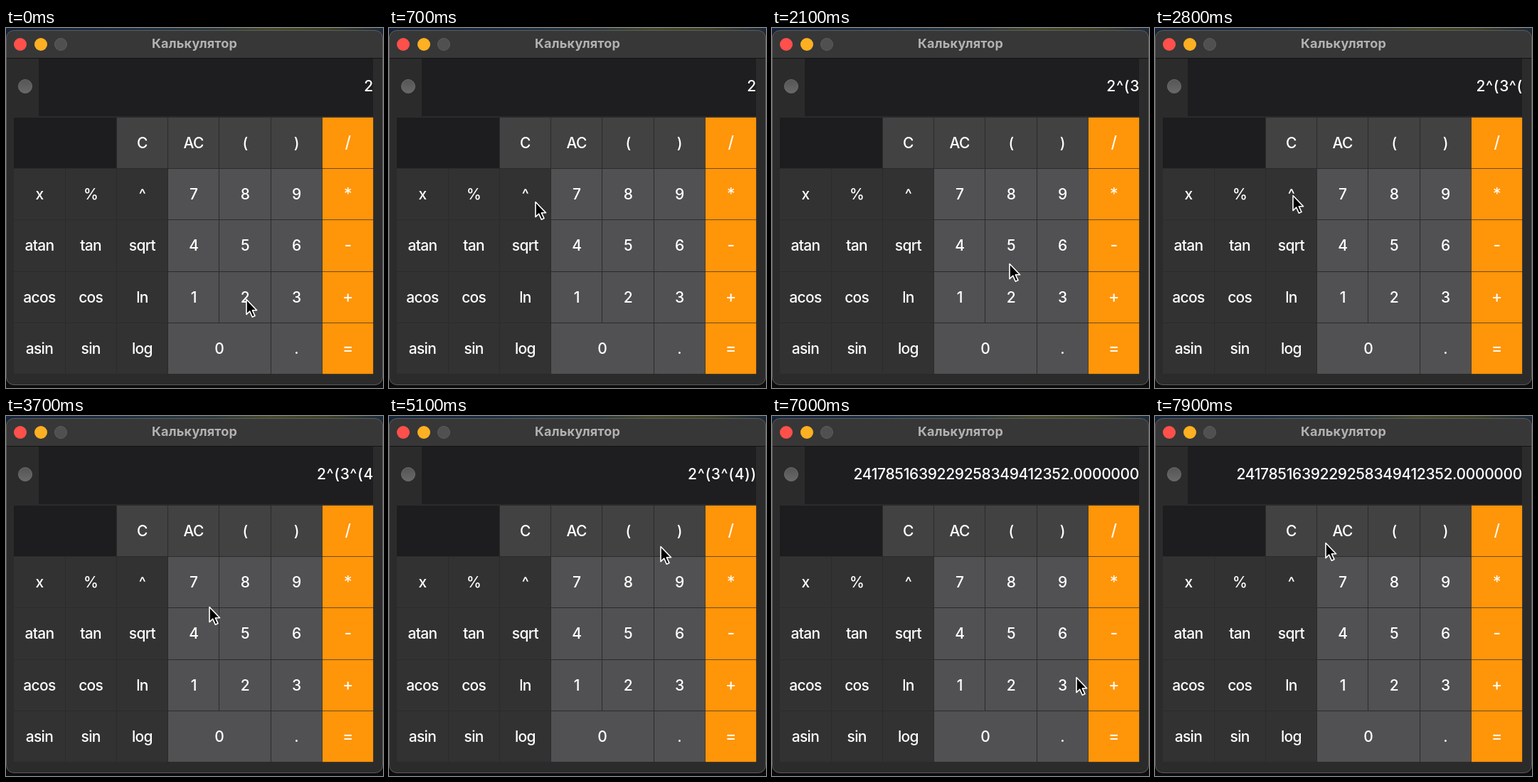
An HTML page that plays this animation: 530 by 506 pixels, repeating every 8 s.

```html
<!DOCTYPE html>
<html lang="ru">
<head>
<meta charset="utf-8">
<title>Калькулятор</title>
<style>
  html, body { margin: 0; width: 100%; height: 100%; overflow: hidden; background: #0b0c0e; }
  #stage {
    position: relative; width: 530px; height: 506px; overflow: hidden;
    background: linear-gradient(90deg, #14243d, #1d2f45 30%, #2a3a3c 55%, #46492a 70%, #3c4226 85%, #1b2a3c) 0 0 / 100% 14px no-repeat #0b0c0e;
    font: 500 21px Inter, Roboto, sans-serif; color: #fff;
  }
  #stage div, #stage svg { position: absolute; box-sizing: border-box; }
  #win { left: 0; top: 3px; width: 530px; height: 499px; border-radius: 11px; background: #2b2b2b; overflow: hidden; }
  #rim { inset: 0; border: 1px solid #5b5b5b; border-radius: 11px; }
  #bar {
    left: 0; top: 0; width: 530px; height: 40px; background: #373737; border-bottom: 1px solid #141414;
    font-weight: 700; font-size: 18px; line-height: 38px; letter-spacing: .2px; text-align: center; color: #b2b2b2;
  }
  .light { top: 10.5px; width: 18px; height: 18px; border-radius: 50%; }
  #lamp { left: 17px; top: 69px; width: 20px; height: 20px; border-radius: 50%; background: linear-gradient(#565656, #686868); border: 1px solid #6e6e6e; }
  #screen { left: 46px; top: 40px; width: 470px; height: 81px; background: #1e1e20; overflow: hidden; }
  #out { right: -1px; top: 0; line-height: 78px; white-space: pre; letter-spacing: .7px; }
  #out.result { right: 0; letter-spacing: -.35px; }
  .key { text-align: center; letter-spacing: -.7px; }
  .blank { background: #1d1d1f; }
  .fn { background: #323232; }
  .top { background: #424242; }
  .num { background: #515153; }
  .op { background: #ff9509; color: #fff8ee; font-size: 23px; box-shadow: 0 0 1px #ff9509; }
  #cursor { left: 0; top: -.5px; overflow: visible; }
</style>
</head>
<body>
<div id="stage">
  <div id="win">
    <div id="bar">Калькулятор</div>
    <div class="light" style="left:10.5px;background:#ff504b"></div>
    <div class="light" style="left:39.5px;background:#fdb022"></div>
    <div class="light" style="left:67.5px;background:#505050;border:1px solid #5c5c5c"></div>
    <div id="lamp"></div>
    <div id="screen"><div id="out">2</div></div>
    <div id="rim"></div>
  </div>
  <svg id="cursor" width="18" height="28">
    <path d="M1 1.5V22.6L5.7 18.2L9.3 26.2L13 24.6L9.4 16.8H15.6Z" fill="#000" stroke="#fff" stroke-width="1.6" stroke-linejoin="round"/>
  </svg>
</div>
<script>
const LOOP = 8000, TICK = 100, PITCH = 72.25, GAP = 1;
const win = document.getElementById('win');
const rim = document.getElementById('rim');
const out = document.getElementById('out');
const cursor = document.getElementById('cursor');

const rows = [
  ['', null, 'C', 'AC', '(', ')', '/'],
  ['x', '%', '^', '7', '8', '9', '*'],
  ['atan', 'tan', 'sqrt', '4', '5', '6', '-'],
  ['acos', 'cos', 'ln', '1', '2', '3', '+'],
  ['asin', 'sin', 'log', '0', null, '.', '=']
];

function keyClass(row, col, label) {
  if (!label) return 'blank';
  if (col === 6) return 'op';
  if (row === 0) return 'top';
  return col < 3 ? 'fn' : 'num';
}

// A null cell is covered by the wide key on its left.
rows.forEach((row, r) => row.forEach((label, c) => {
  if (label === null) return;
  const key = document.createElement('div');
  const span = row[c + 1] === null ? 2 : 1;
  key.className = 'key ' + keyClass(r, c, label);
  key.textContent = label;
  key.style.left = 11.3 + c * PITCH + 'px';
  key.style.top = 122.8 + r * PITCH + 'px';
  key.style.width = span * PITCH - GAP + 'px';
  key.style.height = key.style.lineHeight = PITCH - GAP + 'px';
  win.insertBefore(key, rim);
}));

const entries = [
  [0, '2'], [900, '2^('], [1700, '2^(3'], [2800, '2^(3^('], [3500, '2^(3^(4'],
  [4400, '2^(3^(4)'], [4600, '2^(3^(4))'], [6000, '2417851639229258349412352.0000000']
];

// Pointer stops: time, x, y
const path = [
  [0, 337, 380], [100, 337, 380], [800, 197, 235], [900, 197, 235],
  [1300, 335, 428], [1500, 398, 377], [1600, 398, 375], [1800, 398, 375],
  [2600, 193, 234], [2800, 193, 234], [3400, 253, 295], [3600, 253, 295],
  [3700, 285, 267], [4200, 381, 182], [5100, 381, 182], [5800, 480, 456],
  [6600, 480, 456], [7500, 309, 210], [7900, 239, 177]
];

const slope = (a, b, k) => (b[k] - a[k]) / (b[0] - a[0]);

function tangent(i, k) {
  const a = path[i - 1], p = path[i], b = path[i + 1];
  if (!a || !b) return 0;
  const before = slope(a, p, k), after = slope(p, b, k);
  return before * after <= 0 ? 0 : 2 * before * after / (before + after);
}

function along(i, t, k) {
  const a = path[i], b = path[i + 1], d = b[0] - a[0];
  const u = (t - a[0]) / d, v = 1 - u;
  return v * v * (1 + 2 * u) * a[k] + u * u * (3 - 2 * u) * b[k]
    + d * u * v * (v * tangent(i, k) - u * tangent(i + 1, k));
}

function draw(t) {
  let i = 0;
  while (i < path.length - 2 && t >= path[i + 1][0]) i++;
  cursor.style.transform = `translate(${Math.round(along(i, t, 1))}px, ${Math.round(along(i, t, 2))}px)`;
  const text = entries.filter(e => e[0] <= t).pop()[1];
  if (out.textContent !== text) out.textContent = text;
  out.className = text.includes('.') ? 'result' : '';
}

const start = performance.now();
function frame() {
  const t = (performance.now() - start) % LOOP;
  draw(Math.floor(t / TICK) * TICK);
  requestAnimationFrame(frame);
}
frame();
</script>
</body>
</html>
```
